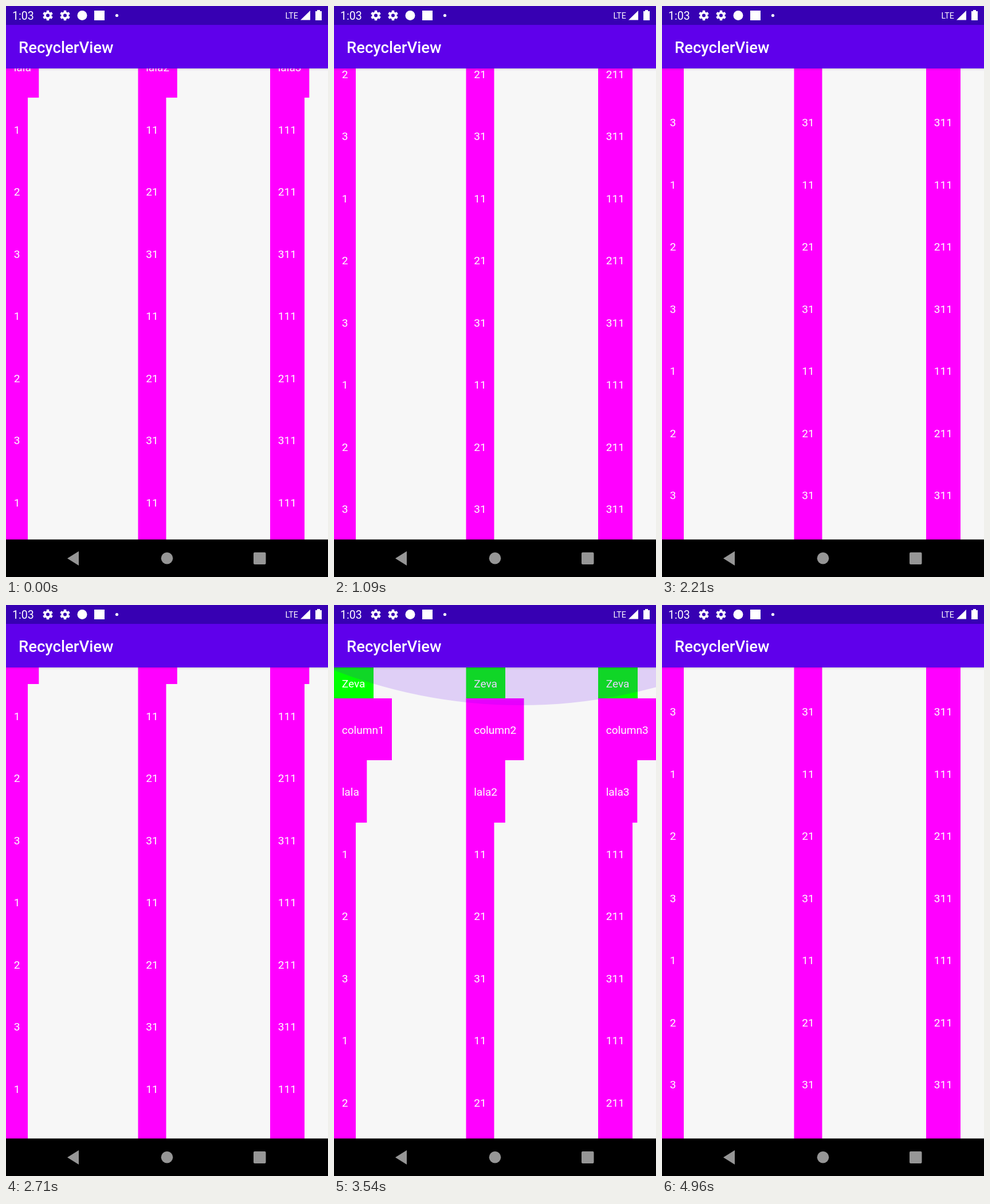
An HTML page with a canvas that plays this animation: 562 px wide and 997 px high, repeating every 5000 ms.

```html
<!DOCTYPE html>
<html lang="en">
<head>
<meta charset="utf-8">
<style>
  html, body { margin: 0; width: 100%; height: 100%; overflow: hidden; background: #000; }
  canvas { display: block; }
</style>
</head>
<body>
<canvas id="stage" width="562" height="997"></canvas>
<script>
const ctx = document.getElementById('stage').getContext('2d');
const LOOP = 5000, WIDTH = 562, TOP = 109, BOTTOM = 931.5;
const HEADER = 53.5, ROW = 108.5, COLUMN = 230.5, PAD = 13.7;
const FONT = 'Roboto, sans-serif';

// [time, scroll offset]
const SCROLL = [
  [0, 218.5], [300, 470], [630, 655], [1090, 750], [1250, 750],
  [1620, 1076.5], [1780, 1076.5], [2300, 690], [2710, 242.2], [2860, 125],
  [3300, 0], [4460, 0], [4500, 1.7], [4700, 165], [4960, 465.5]
];
// [time, depth, opacity] of the overscroll glow
const GLOW = [
  [1600, 0, 0], [1670, 36, .04], [1780, 45, .06], [2260, 0, 0],
  [3300, 0, 0], [3540, 66, .16], [3700, 64, .16], [4460, 0, 0]
];

// text of each cell, its box width and colour
const ROWS = [
  { texts: ['Zeva', 'Zeva', 'Zeva'], widths: [69, 68.5, 69], color: '#0f0' },
  { texts: ['column1', 'column2', 'column3'], widths: [101, 101, 101] },
  { texts: ['lala', 'lala2', 'lala3'], widths: [57.3, 68.3, 68.3] }
];
for (let i = 0; i < 15; i++) {
  const n = i % 3 + 1;
  ROWS.push({ texts: [`${n}`, `${n}1`, `${n}11`], widths: [38, 49, 60] });
}

// Monotone cubic interpolation through the keys
function sample(keys, t, col = 1) {
  const last = keys.length - 1;
  if (t <= keys[0][0]) return keys[0][col];
  if (t >= keys[last][0]) return keys[last][col];
  const slope = i => (keys[i + 1][col] - keys[i][col]) / (keys[i + 1][0] - keys[i][0]);
  const tangent = i => {
    if (i === 0) return slope(0);
    if (i === last) return slope(last - 1);
    const a = slope(i - 1), b = slope(i);
    return a * b > 0 ? 2 * a * b / (a + b) : 0;
  };
  const i = keys.findIndex(k => k[0] > t) - 1;
  const [a, b] = [keys[i], keys[i + 1]];
  const span = b[0] - a[0], u = (t - a[0]) / span, v = 1 - u;
  return a[col] * (1 + 2 * u) * v * v + b[col] * (3 - 2 * u) * u * u
    + span * u * v * (tangent(i) * v - tangent(i + 1) * u);
}

function rect(x, y, w, h, color) {
  ctx.fillStyle = color;
  ctx.fillRect(x, y, w, h);
}

function circle(x, y, r, color) {
  ctx.fillStyle = color;
  ctx.beginPath();
  ctx.arc(x, y, r, 0, 2 * Math.PI);
  ctx.fill();
}

function polygon(color, ...points) {
  ctx.fillStyle = color;
  ctx.beginPath();
  points.forEach(([x, y]) => ctx.lineTo(x, y));
  ctx.closePath();
  ctx.fill();
}

function text(str, x, y, size, weight = 400) {
  ctx.fillStyle = '#fff';
  ctx.font = `${weight} ${size}px ${FONT}`;
  ctx.fillText(str, x, y);
}

function gear(x, y) {
  ctx.strokeStyle = '#fff';
  ctx.lineWidth = 3.6;
  ctx.beginPath();
  ctx.arc(x, y, 4.8, 0, 2 * Math.PI);
  ctx.stroke();
  ctx.lineWidth = 4.4;
  ctx.beginPath();
  for (let i = 0; i < 6; i++) {
    const c = Math.cos((i + .5) * Math.PI / 3), s = Math.sin((i + .5) * Math.PI / 3);
    ctx.moveTo(x + 5.5 * c, y + 5.5 * s);
    ctx.lineTo(x + 8.8 * c, y + 8.8 * s);
  }
  ctx.stroke();
}

function drawList(scroll) {
  let y = TOP - scroll;
  ROWS.forEach(({ texts, widths, color = '#f0f' }, i) => {
    const height = i ? ROW : HEADER;
    if (y + height > TOP && y < BOTTOM) {
      texts.forEach((str, c) => {
        const x = c * COLUMN;
        rect(x, Math.round(y), widths[c], Math.round(y + height) - Math.round(y), color);
        text(str, x + PAD, y + height / 2 + 8.2, 19.12);
      });
    }
    y += height;
  });
}

function drawGlow(t) {
  const depth = sample(GLOW, t), radius = 900;
  if (depth <= 0) return;
  ctx.globalAlpha = sample(GLOW, t, 2);
  if (t < 3000) circle(350, BOTTOM - depth + radius, radius, '#6200ee');
  else circle(326, TOP + depth - radius, radius, '#6200ee');
  ctx.globalAlpha = 1;
}

function drawBars() {
  const shadow = ctx.createLinearGradient(0, TOP, 0, TOP + 4);
  shadow.addColorStop(0, 'rgba(0,0,0,.12)');
  shadow.addColorStop(1, 'rgba(0,0,0,0)');
  rect(0, TOP, WIDTH, 4, shadow);

  rect(0, 0, WIDTH, 33, '#3700b3');
  rect(0, 33, WIDTH, TOP - 33, '#5f00eb');
  text('RecyclerView', 22, 82, 27.5, 500);

  text('1:03', 11, 24, 19.6);
  gear(73, 16.5);
  gear(103, 16.5);
  circle(133, 16.5, 8.5, '#fff');
  rect(154, 8, 18, 17, '#fff');
  circle(193.5, 16.5, 2.6, '#fff');
  text('LTE', 487.5, 22, 14.2);
  polygon('#fff', [531, 8], [531, 24.5], [514, 24.5]);
  rect(540, 9, 11, 16, '#fff');
  rect(543, 7, 5, 2, '#fff');

  const grey = '#969696';
  rect(0, BOTTOM, WIDTH, 997 - BOTTOM, '#000');
  polygon(grey, [127, 952], [127, 977], [107, 964.5]);
  circle(281, 964.3, 10.3, grey);
  ctx.fillStyle = grey;
  ctx.beginPath();
  ctx.roundRect(432, 954, 21.5, 21, 2);
  ctx.fill();
}

function draw() {
  const t = performance.now() % LOOP;
  rect(0, 0, WIDTH, 997, '#f7f7f7');
  drawList(sample(SCROLL, t));
  drawGlow(t);
  drawBars();
  requestAnimationFrame(draw);
}
draw();
</script>
</body>
</html>
```
